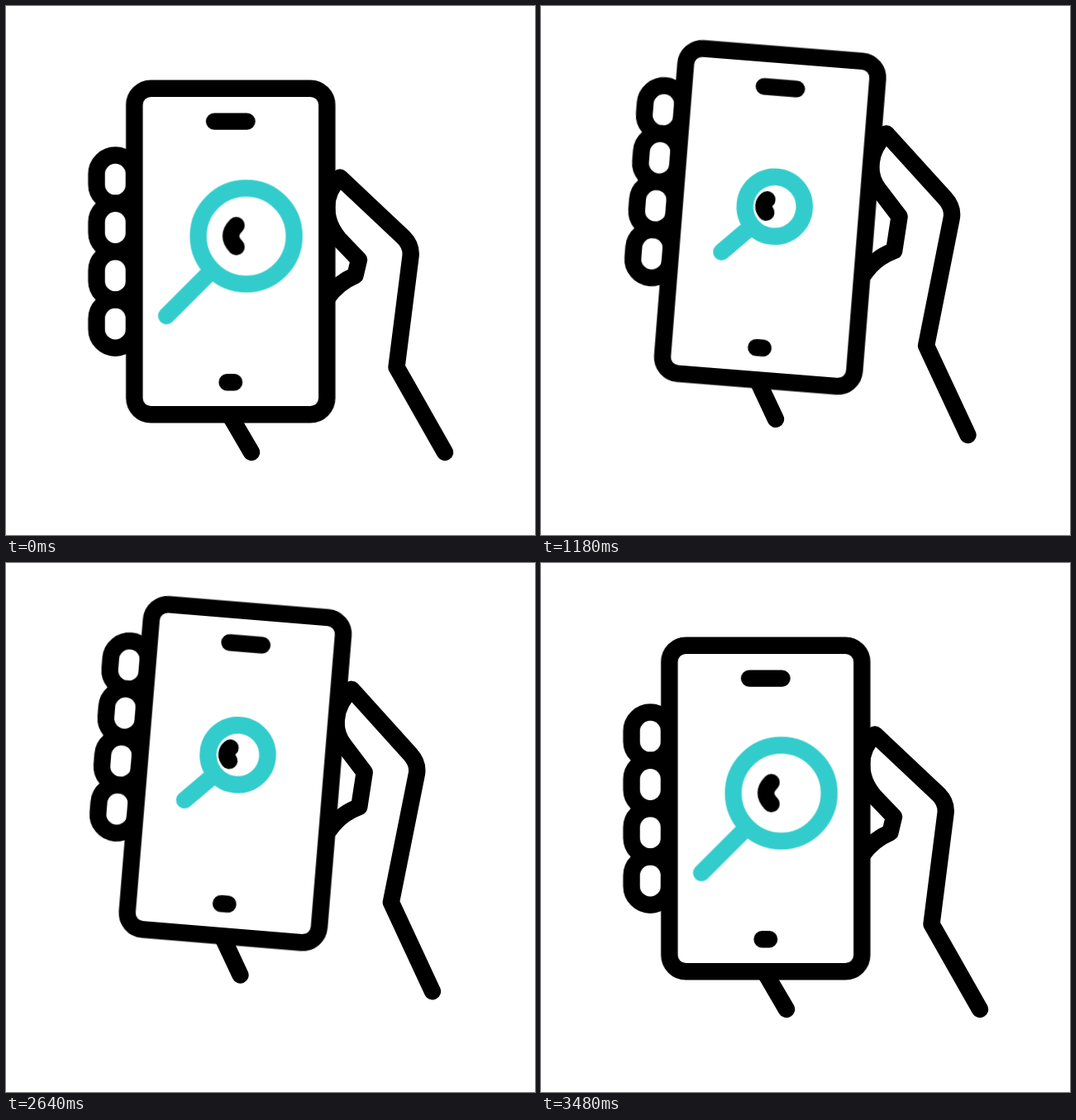
Recreate the animation shown at these times as an HTML page. Size 640x640 px, loop 3.6 s.

```html
<!DOCTYPE html>
<html lang="en">
<head>
<meta charset="utf-8">
<title>Phone search</title>
<style>
html, body { margin: 0; width: 100%; height: 100%; overflow: hidden; background: #fff; }
svg { display: block; width: 100vw; height: 100vh; }
.line { fill: none; stroke: #000; stroke-width: 20.4; stroke-linecap: round; stroke-linejoin: round; }
.teal { stroke: #3cc; }
.dot { fill: #3cc; }

.phone, .fingers, .hand, .lens, .ring, .handle, .glint { animation: 3.6s cubic-bezier(.333, 0, .667, 1) infinite; }
.phone { animation-name: phone; }
.fingers { animation-name: fingers; }
.hand {
  --rest: path("M389 353C400 337 413 330 422.5 326L427 307L403 282C383 258 383 228 404 207.5L481 280C488 287 490.5 294 489.5 303L472.5 437L531 540M266 487L297 540");
  --low: path("M390 391C399 374 411 366 421 361L425 344L395 319C374 296 374 268 391.5 246L475 311C484 318 487 325 486 336L478 442L547 560.5M282 514L314.5 580.5");
  --high: path("M391 321C404 303 417 297 427.5 293L434 250.5L409 217C396 200 396 172 419 150L489.5 229C496.5 237 499 245 497 254L465.5 409.5L515 517M260 448L282.5 496");
  d: var(--rest);
  animation-name: hand;
}
.lens { animation-name: lens; }
.ring { animation-name: ring; }
.handle { animation-name: handle; }
.glint { animation-name: glint; }
.sway { animation: sway 3.6s cubic-bezier(.364, 0, .636, 1) infinite; }
.bob { animation: bob 3.6s cubic-bezier(.364, 0, .636, 1) infinite; }
.dot { r: 0; animation: 3.6s ease-out infinite; }
.d1 { animation-name: dot1; }
.d2 { animation-name: dot2; }
.d3 { animation-name: dot3; }

@keyframes phone {
  0%, 96.296%, 100% { transform: translate(271.8px, 297px) rotate(0deg); }
  10.185%, 16.667%, 83.333%, 85.185% { transform: translate(266px, 320.3px) rotate(-5deg); }
  35.185%, 72.222% { transform: translate(277.7px, 252.7px) rotate(5deg); }
}
/* The fingers slide along the phone's edge */
@keyframes fingers {
  0%, 96.296%, 100% { transform: translate(0, 0); }
  10.185%, 16.667%, 83.333%, 85.185% { transform: translate(.4px, 7.8px); }
  35.185%, 72.222% { transform: translate(.7px, -34.2px); }
}
@keyframes hand {
  0%, 96.296%, 100% { d: var(--rest); }
  10.185%, 16.667%, 83.333%, 85.185% { d: var(--low); }
  35.185%, 72.222% { d: var(--high); }
}

/* The lens shrinks while its line weight stays */
@keyframes lens {
  0%, 16.667%, 88.889%, 100% { transform: translate(18.8px, -18.6px); }
  29.03%, 77.778% { transform: translate(.8px, -19.2px); }
}
@keyframes ring {
  0%, 16.667%, 88.889%, 100% { r: 58px; }
  29.03%, 77.778% { r: 36px; }
}
@keyframes handle {
  0%, 16.667%, 88.889%, 100% { d: path("M-42 42L-96.5 96.5"); }
  29.03%, 77.778% { d: path("M-26 26L-59.8 59.8"); }
}
@keyframes glint {
  0%, 16.667%, 88.889%, 100% { d: path("M-12 -13Q-25 0 -12 13"); }
  29.03%, 77.778% { d: path("M-9.8 -7.8Q-17 0 -9.8 7.8"); }
}

/* Two counter-clockwise search loops */
@keyframes sway {
  0%, 29.907%, 52.13%, 74.352%, 100% { transform: translateX(0); }
  41.018%, 63.241% { transform: translateX(23.3px); }
}
@keyframes bob {
  0%, 74.352%, 100% { transform: translateY(0); }
  29.907% { transform: translateY(0); animation-timing-function: cubic-bezier(.61, 1, .88, 1); }
  35.463%, 57.685% { transform: translateY(8px); }
  46.574% { transform: translateY(-12.5px); }
  68.796% { transform: translateY(-12.5px); animation-timing-function: cubic-bezier(.12, 0, .39, 0); }
}

@keyframes dot1 {
  0%, 35.185%, 55.5%, 100% { r: 0; }
  38.5%, 52.8% { r: 15.5px; }
}
@keyframes dot2 {
  0%, 39.3%, 55.5%, 100% { r: 0; }
  42.6%, 52.8% { r: 15.5px; }
}
@keyframes dot3 {
  0%, 43.6%, 55.5%, 100% { r: 0; }
  46.9%, 52.8% { r: 15.5px; }
}
</style>
</head>
<body>
<svg viewBox="0 0 640 640">
  <path class="line hand"/>
  <g class="phone">
    <g class="line">
      <g class="fingers">
        <rect x="-162.3" y="-116.5" width="45.5" height="58.3" rx="22.75"/>
        <rect x="-162.3" y="-58.2" width="45.5" height="58.3" rx="22.75"/>
        <rect x="-162.3" y=".1" width="45.5" height="58.3" rx="22.75"/>
        <rect x="-162.3" y="58.4" width="45.5" height="58.3" rx="22.75"/>
      </g>
      <rect x="-116.5" y="-197.3" width="233" height="394.6" rx="20" fill="#fff"/>
      <path d="M-19.8 -157.4H19.7M-4.3 158.3H4.2"/>
    </g>
    <circle class="dot d1" cx="-36" cy="92"/>
    <circle class="dot d2" cx="1.3" cy="92"/>
    <circle class="dot d3" cx="38.6" cy="92"/>
    <g class="sway"><g class="bob"><g class="lens">
      <path class="line teal handle"/>
      <circle class="line teal ring"/>
      <path class="line glint"/>
    </g></g></g>
  </g>
</svg>
</body>
</html>
```
